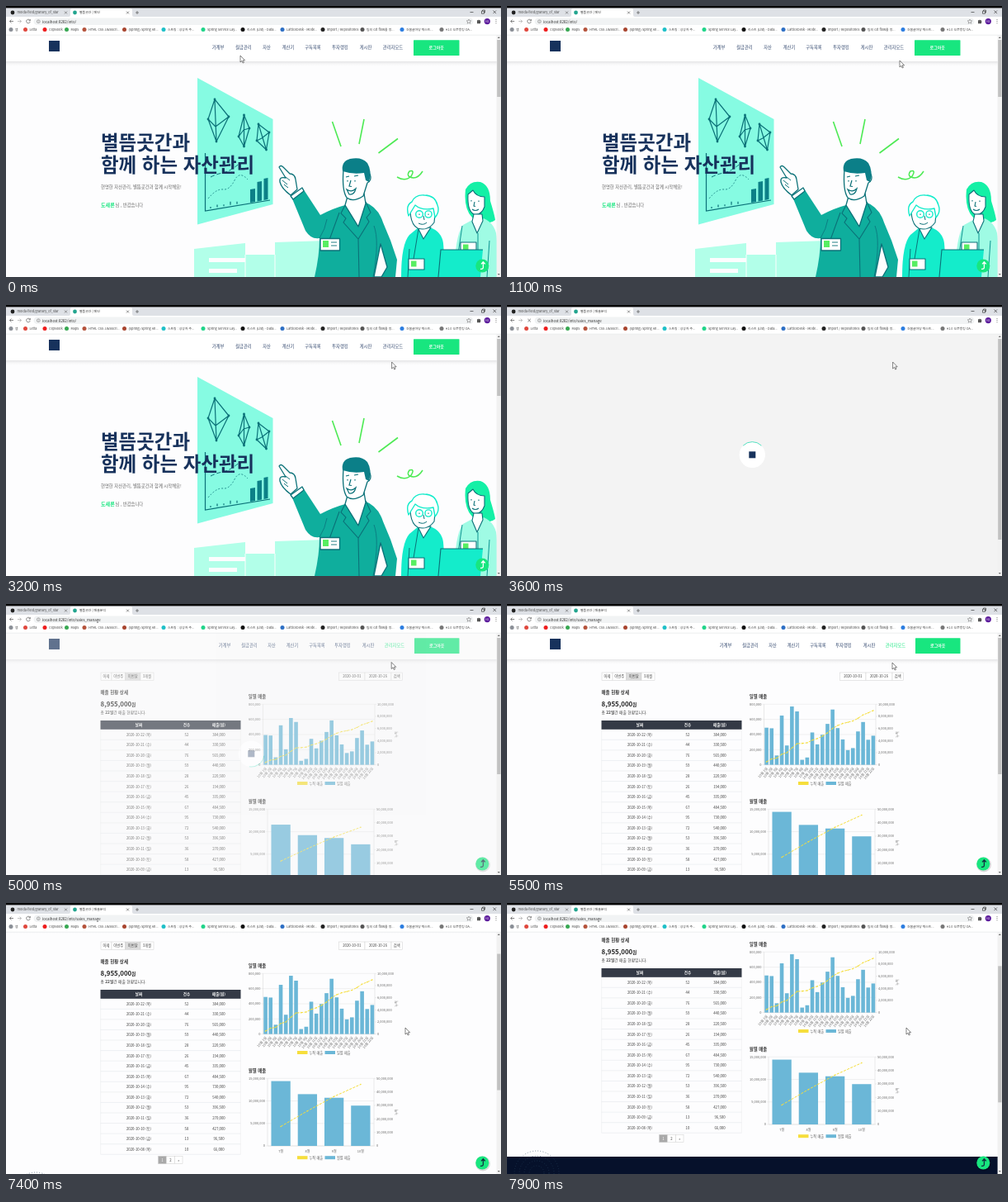
Write an HTML page that moves like this. It is 600 by 328 pixels and loops after 8000 ms.

```html
<!DOCTYPE html>
<html lang="ko">
<head>
<meta charset="utf-8">
<style>
html, body { margin: 0; width: 100%; height: 100%; overflow: hidden; background: #fff; }
svg { display: block; width: 600px; height: 328px; }
text { font-family: "Noto Sans CJK KR", "Noto Sans CJK", "Noto Sans", sans-serif; white-space: pre; }
</style>
</head>
<body>
<svg id="stage" viewBox="0 0 600 328" xmlns="http://www.w3.org/2000/svg"></svg>
<script>
const MID = 'text-anchor="middle" ', END = 'text-anchor="end" ', BOLD = 'font-weight="700"';
const NAVY = '#17325c', GREEN = '#18e67f', TEAL = '#0fae9d', DEEP = '#0b7178', AQUA = '#14eccb', MINT = '#86fbe2';
const BLUE = '#6bb7d7', YELLOW = '#f6de3c', LIME = '#4eea55', PAGE = '#fdfdfe';

const rect = (x, y, w, h, f, e = '') => `<rect x="${x}" y="${y}" width="${w}" height="${h}" fill="${f}" ${e}/>`;
const circ = (x, y, r, f, e = '') => `<circle cx="${x}" cy="${y}" r="${r}" fill="${f}" ${e}/>`;
const fill = (d, f, e = '') => `<path d="${d}" fill="${f}" ${e}/>`;
const line = (d, s, w = 1, e = '') => `<path d="${d}" fill="none" stroke="${s}" stroke-width="${w}" ${e}/>`;
const text = (x, y, s, z, f, e = '') => `<text x="${x}" y="${y}" font-size="${z}" fill="${f}" ${e}>${s}</text>`;
const group = (id, s, e = '') => `<g id="${id}" ${e}>${s}</g>`;
const commas = n => n.toLocaleString('en-US');

function browser() {
  const marks = [
    [6, '앱', '#8a8f96'], [23.5, 'Letta', '#e0483e'], [47, 'ClipNook', '#ee1c1c'], [73.5, 'Maps', '#38a853'],
    [95, 'HTML CSS JavaScri...', '#b5533c'], [143.5, '(Spring) Spring An...', '#a8452f'],
    [191, '스프링 : 성상자 주...', '#1fc0c8'], [239, 'Spring Service Lay...', '#20d489'],
    [287, '리스트 (List) - Data...', '#111'], [335, 'LatticeDesk - Mode...', '#2d6fc4'],
    [384, 'import / Repositories', '#222'], [432, '팀의 Git flow를 정...', '#555'],
    [480, '건봄글마당 텍스트...', '#2b7de0'], [528, '#1.0 오픈뱅킹 OA...', '#777']
  ];
  return rect(0, 0, 600, 35.5, '#fff') + rect(0, 2, 600, 11, '#dee1e6') + rect(0, 0, 600, 2.4, '#050505') +
    circ(8, 8, 2.4, '#222') + text(13.5, 9.4, 'molda-field/granary_of_star', 3.8, '#444') +
    line('M71 6.5l3 3m0-3l-3 3', '#555', .6) +
    fill('M76 13q2 0 2-2V5q0-2 2-2h71q2 0 2 2v6q0 2 2 2z', '#fff') +
    circ(83.5, 8, 2.4, '#23a58f') + `<text id="tab" x="89" y="9.4" font-size="3.9" fill="#333"></text>` +
    line('M146 6.5l3 3m0-3l-3 3M157 8h4m-2-2v4', '#444', .6) +
    line('M562.5 7.5h4M590.5 5.5l3.6 3.6m0-3.6l-3.6 3.6M576.5 6.2h3v3h-3zM577.5 6v-1h3v3h-1', '#222', .6) +
    line('M9 18.5H4.5m2-2l-2 2l2 2', '#555', .7) + line('M14 18.5h4.5m-2-2l2 2l-2 2', '#aaa', .7) +
    group('reload', line('M29 17.4a2.3 2.3 0 1 0 .2 1.8M29.3 16v1.8h-1.8', '#555', .7)) +
    group('stop', line('M25.2 16.8l3.6 3.6m0-3.6l-3.6 3.6', '#555', .7)) +
    rect(33.5, 14.4, 533, 8.6, '#f1f3f4', 'rx="4.3"') +
    circ(39.3, 18.7, 1.9, 'none', 'stroke="#666" stroke-width=".5"') + line('M39.3 18.4v1.3m0-2.2v.5', '#666', .5) +
    `<text id="url" x="44" y="20.5" font-size="4.4" fill="#333"></text>` +
    fill('M561 16l.8 1.8 2 .1-1.5 1.3.5 2-1.8-1.1-1.8 1.1.5-2-1.5-1.3 2-.1z', 'none', 'stroke="#666" stroke-width=".5"') +
    fill('M571 17.3h1.4q.6-1.8 1.2 0h1.4v1.3q1.8.6 0 1.2v1.4h-4z', '#555') +
    circ(583.3, 18.6, 3.6, '#5c1c9c') + text(583.3, 19.9, 'HJ', 3.2, '#fff', MID) +
    [16.5, 18.6, 20.7].map(y => circ(594, y, .5, '#555')).join('') +
    marks.map(([x, s, c]) => circ(x, 28.6, 2.5, c) + text(x + 5, 30, s, 3.85, '#444')).join('') +
    line('M0 35.2H600', '#d8dadd', .5);
}

function siteHeader(xs, buttonX, active) {
  const items = ['가계부', '월급관리', '자산', '계산기', '구독목록', '투자랭킹', '게시판', '관리자모드'];
  return rect(0, 66, 595, 8, 'url(#shade)') + rect(0, 35, 595, 32, '#fff') + rect(52, 42, 13, 13, NAVY) +
    items.map((s, i) => text(xs[i], 52.4, s, 5.3, active && i === 7 ? GREEN : '#34496f', MID)).join('') +
    rect(buttonX, 41.2, 549.5 - buttonX, 18.8, GREEN, 'rx=".6"') +
    text((buttonX + 549.5) / 2, 52.3, '로그아웃', 5, '#fff', MID + BOLD);
}

function board() {
  const gem = (top, left, bottom, right, mid) => {
    const tips = [top, left, bottom, right];
    return line(`M${tips.join('L')}ZL${bottom}M${left}L${mid}L${right}`, DEEP, 1.2, 'stroke-linejoin="round"') +
      tips.map(([x, y]) => circ(x, y, 1.4, DEEP)).join('');
  };
  return fill('M232 87L323.5 137V240L232 264.5Z', MINT) +
    gem([253, 113], [245, 137], [255, 164], [270, 134], [254, 146]) +
    gem([288.5, 132], [282, 158], [288.5, 170], [295, 148], [288, 150]) +
    gem([306, 143], [304, 163], [315.5, 174], [319, 153], [310, 160]) +
    line('M241.5 178V248L320 235', DEEP, 1.2) +
    line('M248 207Q256 203 263 202T284 190', DEEP, 1, 'stroke-dasharray="5 3"') +
    line('M245 233Q255 221 263 222T277 211T293 210', DEEP, .8, 'stroke-dasharray="2 2"') +
    line('M248 245v-2m8 .6v-3m8 1.6v-2m8 .6v-4m8 3v-3', DEEP, 1.2) +
    fill('M296 222l6-1v16l-6 1zM304.5 213l5.5-1v23.5l-5.5 1zM312.5 209l5-1v26l-5 1z', '#0c8087');
}

function building() {
  return fill('M228 294L290 287V301H326V286L388 284V328H228Z', '#b2ffe9') +
    rect(246, 305, 44, 5, PAGE) + rect(246, 318, 34, 5, PAGE) + line('M290 301V328M326 301V328', PAGE, 1);
}

const badge = (x, y, ink) => rect(x, y, 19, 13, '#fff', ink) + rect(x + 3, y + 2.5, 6.5, 7, '#58ee62');

function man() {
  const ink = `stroke="${DEEP}" stroke-width="1.3" stroke-linejoin="round"`;
  return fill('M331 195q2-3 5 0l8 8q6 0 7 7l2 12-8 7q-11-8-13-16-1-7 7-5z', '#fff', ink) +
    line('M339 207l5 4m-9 0l6 5m-4 0l5 4', DEEP, 1) +
    fill('M346 231L360 221L381 253Q396 245 411 241L434 237Q451 243 457 262Q467 284 474 307L472 328H374Q380 302 380 281Q370 283 363 272Z', TEAL) +
    fill('M345 230l14-10 2 4-13 10z', '#fff', ink) +
    fill('M454 288L462 316L455 328H446Z', PAGE, ink) +
    fill('M411 241L415 227H434L436 239L427 267Z', '#fff', ink) +
    line('M411 241l-5 10 6 6-3 5 18 20 13-21-3-5 5-6-6-13M427 282L428 328M404 250L392 283', DEEP, 1.1) +
    line('M380 281Q387 270 389 258M446 266Q453 284 445 328', '#0b7f83', 1) +
    fill('M409 198Q407 223 413 232Q421 238 433 230L438 214Q444 211 441 203Q424 197 409 198Z', '#fff', ink) +
    fill('M408 200Q406 188 417 185Q431 182 438 190Q444 200 440 213L436 211L434 202Q420 204 408 200Z', '#0b7f88') +
    line('M412 207l4-1m6 0l5-1M414 211v1.5m9-1.5v1.5M418 211l-2 7 3 .5M413 222q6 4 11-1-2 8-8 7z', DEEP, 1.2) +
    rect(381, 281.5, 23.5, 14.5, '#fff', ink) + rect(384, 284, 7, 8, '#58ee62') + line('M394 286h7m-7 4h7', DEEP, .9);
}

function colleagues() {
  const ink = `stroke="${DEEP}" stroke-width="1.1" stroke-linejoin="round"`;
  const bright = `stroke="${AQUA}" stroke-width="1.4" stroke-linejoin="round"`;
  return fill('M479 328Q479 288 489 277L500 268H514Q528 273 530 287L533 328Z', AQUA) +
    fill('M499 268l7 14 9-14z', '#fff', ink) + line('M489 294l-2 34M500 270L494 306', DEEP, 1) +
    fill('M490 241Q489 264 499 269Q511 273 519 262L521 241Z', '#fff', ink) +
    fill('M488 254Q484 241 492 237Q496 228 507 229Q520 229 523 241Q526 249 520 256L518 245Q504 248 496 241Z', '#fff', bright) +
    circ(501, 252, 4.3, 'none', bright) + circ(512, 252, 4.1, 'none', bright) +
    line('M501 251.5v1.5M512 251.5v1.5M506 254l1 5M500 263q6 3 10-1', DEEP, 1) +
    badge(488, 306, ink) +
    fill('M557 222Q563 211 575 213Q587 217 587 236Q592 252 593 259Q583 266 570 260Q554 250 557 222Z', '#14f0a6') +
    fill('M560 228Q559 248 567 252Q576 254 580 243L580 231Q570 231 566 223Z', '#fff', ink) +
    line('M564 235v1.5m9-1v1.5M568 237l-1 5 2 .5M565 246q4 3 8 0', DEEP, 1.1) +
    fill('M543 328Q544 278 554 265L567 258L573 264L579 257Q595 264 595 284V328Z', '#9ffbe4') +
    fill('M567 252h10l1 8-7 15-6-14z', '#fff', ink) + line('M553 266L548 300M586 284l-3 44M572 275v50', '#0b9390', 1) +
    badge(551, 286, ink) +
    fill('M527 295H578L575 328H524Z', AQUA) + line('M524 328L527 295H578', DEEP, 1.1);
}

const topButton = ink => circ(577.3, 314.5, 8, GREEN) +
  line('M575 318.3q4 .6 3.4-3V310m-2.4 2.4l2.4-2.6 2.4 2.6', ink, 1.3);

function home() {
  return rect(0, 35, 595, 293, PAGE) + building() + board() + man() + colleagues() +
    line('M395.5 140L406 170M434 137L428 167M475 160.5L451.5 178', LIME, 1.6) +
    line('M474 207Q484 213 491 206Q496 198 489 200Q484 207 494 208Q500 208 505 200', LIME, 1.5) +
    text(115, 174, '별뜸곳간과', 23.5, NAVY, BOLD) + text(115, 200.5, '함께 하는 자산관리', 23.5, NAVY, BOLD) +
    text(115, 221, '현명한 자산관리, 별뜸곳간과 함께 시작해요!', 5.35, '#666') +
    text(115, 243, '도새론', 6.1, GREEN, BOLD) + text(132.5, 243, '님 , 반갑습니다', 5.3, '#666') +
    siteHeader([257, 288, 316, 342, 372, 405, 436, 469], 494, false) + topButton('#fff');
}

// Newest day first: visits, sales in thousands
const days = [[52, 384], [44, 330.5], [76, 565], [59, 440.5], [28, 220.5], [26, 194], [45, 335], [67, 484.5],
  [95, 730], [72, 540], [53, 396.5], [36, 270], [58, 427], [13, 96.5], [10, 66]];
const daily = [490, 482, 123, 650, 255, 770, 705, ...days.map(d => d[1]).reverse()];
const monthly = [14.4, 11.5, 10.7, 8.955];

function table() {
  const week = '일월화수목금토', cols = [161, 219, 258];
  const head = ['날짜', '건수', '매출(원)'].map((s, i) => text(cols[i], 147.8, s, 4.5, '#fff', MID + BOLD)).join('');
  const rows = days.map(([n, k], i) => {
    const y = 158.1 + i * 12.57, d = 22 - i;
    const cells = [`2020-10-${String(d).padStart(2, '0')} (${week[(d + 3) % 7]})`, n, commas(k * 1000)];
    return cells.map((s, j) => text(cols[j], y + 1.6, s, 4.3, '#444', MID)).join('') +
      line(`M114.5 ${y + 6.2}H284.5`, '#dee2e6', .5);
  }).join('');
  return rect(114.5, 141, 170, 10.8, '#343a46') + head + rows + line('M114.7 152V340M284.3 152V340', '#e6e8eb', .5);
}

function chart({ id, x0, x1, top, base, values, max, left, right, sumMax, barW, labels, tilt, legendY, kind }) {
  const n = values.length, step = (x1 - x0) / n, h = base - top;
  let s = '', bars = '', pts = [], sum = 0;
  left.forEach((v, i) => {
    const y = base - h * i / (left.length - 1);
    s += line(`M${x0 - 2} ${y}H${x1}`, '#e3e3e3', .5) + text(x0 - 3, y + 1.4, commas(v), 4, '#666', END);
  });
  right.forEach((v, i) => {
    const y = base - h * i / (right.length - 1);
    s += line(`M${x1} ${y}h2`, '#ddd', .5) + text(x1 + 3, y + 1.4, commas(v), 4, '#666');
  });
  values.forEach((v, i) => {
    const x = x0 + step * (i + .5), bh = h * v / max;
    sum += v;
    bars += rect(x - barW / 2, base - bh, barW, bh, BLUE);
    pts.push([x, base - h * sum / sumMax]);
    s += tilt ? text(0, 0, labels(i), 4, '#666', `${END} transform="translate(${x + 1.5} ${base + 4.5}) rotate(-50)"`)
      : text(x, base + 7.5, labels(i), 4, '#666', MID);
  });
  const trend = line('M' + pts.map(p => p.join(' ')).join('L'), YELLOW, 1, 'stroke-dasharray="3 1.5"') +
    pts.map(p => circ(p[0], p[1], .8, YELLOW)).join('');
  return s + line(`M${x0} ${top}V${base}H${x1}V${top}`, '#d5d5d5', .5) + group(id, bars + trend) +
    text(0, 0, '누적', 4, '#777', `${MID} transform="translate(474.5 ${(top + base) / 2}) rotate(-90)"`) +
    rect(353, legendY - 2, 12.5, 4, YELLOW) + text(367.5, legendY + 1.5, '누적 매출', 4.2, '#666') +
    rect(386.5, legendY - 2, 12.5, 4, BLUE) + text(401, legendY + 1.5, kind + ' 매출', 4.2, '#666');
}

function sales() {
  const box = (x, w, s, f = '#fff', y = 83) => rect(x, y, w, 9.4, f, 'stroke="#cfcfcf" stroke-width=".5"') +
    text(x + w / 2, y + 6.2, s, 4.3, '#444', MID);
  const dots = [9, 15, 21, 27].map(r => circ(36, 389, r, 'none', 'stroke="#24405a" stroke-width=".7" stroke-dasharray=".8 2.4"')).join('');
  const ticks = (n, d) => Array.from({ length: n }, (_, i) => i * d);
  return rect(0, 35, 595, 380, PAGE) +
    siteHeader([265, 295, 322, 347, 377, 408, 439, 471], 495, true) +
    box(115, 13, '어제') + box(128, 16.5, '이번주') + box(144.5, 18.5, '이번달', '#dcdcdc') + box(163, 16, '3개월') +
    box(403.5, 31.5, '2020-10-01') + box(435, 32, '2020-10-26') + box(467, 13.3, '검색') +
    text(114.5, 109.2, '매출 현황 상세', 5.5, '#333', BOLD) +
    text(114.5, 124.2, '8,955,000<tspan font-size="5.4">원</tspan>', 7.9, '#222', BOLD) +
    text(114.5, 133.2, '총 <tspan font-weight="700">22일</tspan>간 매출 현황입니다.', 4.8, '#444') +
    table() +
    text(293.8, 113.5, '일별 매출', 5.4, '#333', BOLD) +
    chart({ id: 'dayBars', x0: 311.5, x1: 447, top: 121.3, base: 194.6, values: daily, max: 800, sumMax: 10000,
      left: ticks(5, 200000), right: ticks(6, 2000000), barW: 4.6, labels: i => `10월 ${i + 1}일`, tilt: true,
      legendY: 217, kind: '일별' }) +
    text(293.8, 241.2, '월별 매출', 5.4, '#333', BOLD) +
    chart({ id: 'monthBars', x0: 317, x1: 446, top: 248.3, base: 330, values: monthly, max: 15, sumMax: 50,
      left: ticks(4, 5000000), right: ticks(6, 10000000), barW: 23.3, labels: i => `${i + 7}월`, tilt: false,
      legendY: 344.2, kind: '월별' }) +
    box(184.5, 10, '<tspan fill="#fff">1</tspan>', '#a9a9a9', 342.3) + box(194.5, 10, '2', '#fff', 342.3) + box(204.5, 9.5, '»', '#fff', 342.3) +
    rect(0, 369, 595, 60, '#06112b') + dots;
}

document.getElementById('stage').innerHTML =
  `<defs><linearGradient id="shade" x2="0" y2="1"><stop stop-color="#dcdcde"/><stop offset="1" stop-color="#fff" stop-opacity="0"/></linearGradient>
  <clipPath id="view"><rect y="35" width="595" height="293"/></clipPath></defs>` +
  rect(0, 0, 600, 328, '#fff') +
  `<g clip-path="url(#view)">` + group('home', home()) +
  group('salesView', group('sales', sales()) + circ(578, 315.5, 9, '#000', 'opacity=".14"') + topButton('#123040')) +
  group('loader', rect(0, 35, 595, 293, '#f3f3f3') + circ(297.3, 181.3, 15.7, '#fff') +
    rect(293.3, 177.3, 8, 8, NAVY) + group('arc', line('M286.2 170.2A15.7 15.7 0 0 1 308.4 170.2', '#54dfc0', 1))) + '</g>' +
  rect(594.6, 35, 5.4, 293, '#f1f1f1') + `<rect id="thumb" x="595.2" width="4.3" fill="#c1c1c1"/>` +
  fill('M595.8 39l1.5-1.8 1.5 1.8zM595.8 324l1.5 1.8 1.5-1.8z', '#666') + browser() +
  group('cursor', fill('M0 0V8L1.9 6.3L3.1 9L4.4 8.4L3.2 5.8H5.6Z', '#fff', 'stroke="#333" stroke-width=".6" stroke-linejoin="round"'));

const el = Object.fromEntries([...document.querySelectorAll('[id]')].map(n => [n.id, n]));
const show = (n, on) => n.setAttribute('display', on ? 'inline' : 'none');
const clamp = v => Math.max(0, Math.min(1, v));

function track(keys, t) {
  const i = keys.findIndex(k => k[0] > t);
  if (i < 0) return keys[keys.length - 1].slice(1);
  const a = keys[i - 1], b = keys[i], p = (t - a[0]) / (b[0] - a[0]);
  return a.slice(1).map((v, j) => v + (b[j + 1] - v) * p);
}

const LEAVE = 3300, MEASURED = 4100, READY = 4800;
const pointer = [[0, 284, 60], [1100, 476, 66], [2500, 376, 98], [2900, 469, 53], [3200, 467.6, 69],
  [3600, 467.6, 69], [5500, 467, 71], [6500, 484, 151]];
// Two wheel notches
const scrolling = [[0, 0], [6600, 0], [6700, 4], [6800, 25], [6900, 31], [7300, 31], [7400, 36], [7500, 56], [7600, 62]];

function draw(t) {
  const left = t >= LEAVE, ready = t >= READY, loading = left && !ready;
  const [x, y] = track(pointer, t), [scroll] = track(scrolling, t);
  show(el.home, !left);
  show(el.salesView, ready);
  show(el.loader, left && t < READY + 300);
  show(el.stop, loading);
  show(el.reload, !loading);
  el.loader.setAttribute('opacity', 1 - clamp((t - READY) / 300));
  el.arc.setAttribute('transform', `rotate(${(t - 3600) * .36} 297.3 181.3)`);
  el.tab.textContent = '별뜸곳간 | ' + (left ? '매출분석' : '메인');
  el.url.textContent = 'localhost:8282/into/' + (left ? 'sales_manage' : '');
  el.sales.setAttribute('transform', `translate(0 ${-scroll})`);
  const grow = 1 - (1 - clamp((t - READY) / 600)) ** 4;
  for (const [n, base] of [[el.dayBars, 194.6], [el.monthBars, 330]])
    n.setAttribute('transform', `translate(0 ${base * (1 - grow)}) scale(1 ${grow})`);
  el.thumb.setAttribute('y', 41 + scroll * .57);
  el.thumb.setAttribute('height', !left ? 69 : t < MEASURED ? 243 : 165);
  el.cursor.setAttribute('transform', `translate(${x} ${y})`);
}

const start = performance.now();
function tick() {
  const t = (performance.now() - start) % 8000;
  draw(Math.floor(t / 100) * 100);
  requestAnimationFrame(tick);
}
tick();
</script>
</body>
</html>
```
